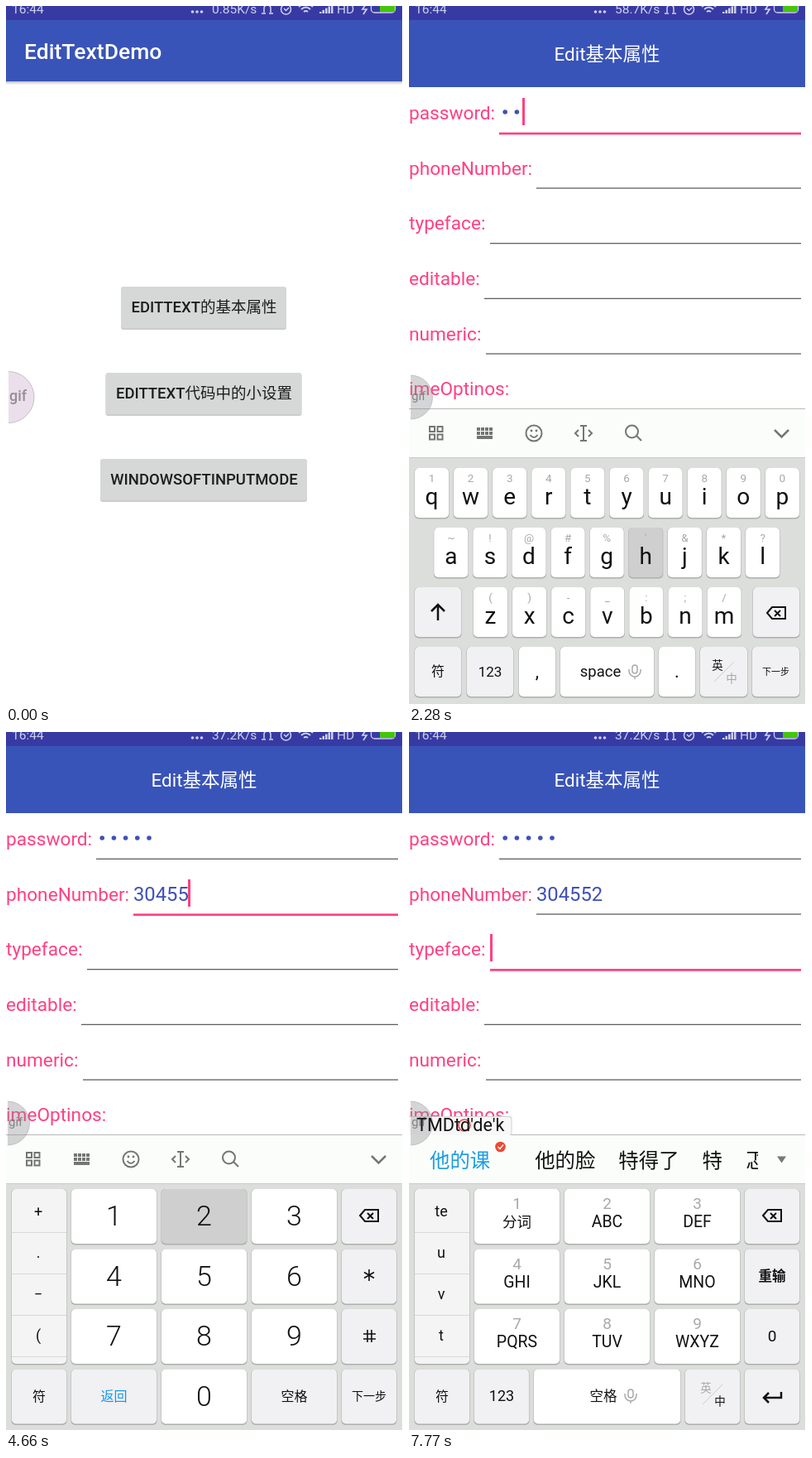
Animation of 480x843 px, one loop 8 s. Source, as an HTML page with a canvas:

```html
<!DOCTYPE html>
<html lang="zh-CN">
<head>
<meta charset="utf-8">
<title>EditTextDemo</title>
<style>
html, body { margin: 0; width: 100%; height: 100%; overflow: hidden; background: #fff; }
canvas { display: block; }
</style>
</head>
<body>
<canvas id="stage" width="480" height="843"></canvas>
<script>
const c = document.getElementById('stage').getContext('2d');
const LOOP = 8000, PINK = '#ff4081', BLUE = '#3f51b5', INK = '#111', GREY = '#a8a8a8';
const KEY = '#fff', SOFT = '#f1f0f2', DOWN = '#cfcfcf';
const FIELDS = ['password', 'phoneNumber', 'typeface', 'editable', 'numeric',
  'imeOptinos', 'digits', 'cursorVisible', 'textStyle', 'capitalize'];
const PHONE = '304552';
const BLINKS = [810, 1300, 3010, 3420, 5880, 6550, 7100, 7550];
const DOT_TIMES = [2150, 2255, 2360, 2465, 2570];
const DIGIT_TIMES = [4110, 4310, 4400, 4490, 4570, 5040];
const PRESSES = [
  [2150, 2255, 'g'], [2255, 2360, 'h'], [2360, 2465, 'j'], [2465, 2570, 'g'],
  [4490, 4660, '5'], [4660, 5040, '2'],
  [6035, 6110, 'TUV'], [6110, 6190, 'MNO'], [6550, 6643, 'DEF'], [7550, 7660, 'JKL']
];
// [start, composed text, candidates, side column]
const INPUTS = [
  [5880, '', null, '，,。,？,！'],
  [6035, '', '他,天,图,to,听,特,台,同', 'u,v,t,8'],
  [6190, '', '投,同,TM,to,UN,透,痛,他', 'u,v,t,8'],
  [6550, 'TMD', '同的,头的,特,同,TM,痛,图', 'u,v,t,8'],
  [6737, "TMDt'd", '他的,特点,天大,特地,特,同', 'te,u,v,t'],
  [7100, "TMDtd'd", '他的,特点,特得,天地,特,同', 'te,u,v,t'],
  [7300, "TMDtd'de", '特得,他的,天地的,特,同,图', 'te,u,v,t'],
  [7660, "TMDtd'de'k", '他的课,他的脸,特得了,特,忑', 'te,u,v,t']
];
let now = 0;

const passed = times => times.filter(t => t <= now).length;
const pressed = name => PRESSES.some(([a, b, k]) => k === name && now >= a && now < b);
const currentInput = () => INPUTS.filter(step => step[0] <= now).pop();

function box(x, y, w, h, fill) {
  c.fillStyle = fill;
  c.fillRect(x, y, w, h);
}
function round(x, y, w, h, r, fill) {
  c.beginPath();
  c.roundRect(x, y, w, h, r);
  c.fillStyle = fill;
  c.fill();
}
function disc(x, y, r, fill) {
  c.beginPath();
  c.arc(x, y, r, 0, 7);
  c.fillStyle = fill;
  c.fill();
}
function line(path, color, width = 2) {
  c.strokeStyle = color;
  c.lineWidth = width;
  c.stroke(new Path2D(path));
}
function font(size, weight = 400) {
  c.font = `${weight} ${size}px Roboto, "Noto Sans CJK SC", "Noto Sans CJK", sans-serif`;
}
function text(s, x, y, size, color = INK, align = 'center', weight = 400) {
  font(size, weight);
  c.textAlign = align;
  c.fillStyle = color;
  c.fillText(s, x, y);
  return c.measureText(s).width;
}

function bars(height) {
  box(0, 0, 480, 17, '#383aa4');
  box(0, 17, 480, height - 17, '#3954b8');
}
function homePage() {
  box(0, 0, 480, 843, '#fff');
  for (let i = 0; i < 4; i++) box(0, 91 + i, 480, 1, `rgba(0,0,0,${0.22 - i * 0.06})`);
  bars(91);
  text('EditTextDemo', 22, 64, 26.5, '#fff', 'left', 500);
  const buttons = [['EDITTEXT的基本属性', 200], ['EDITTEXT代码中的小设置', 237], ['WINDOWSOFTINPUTMODE', 250]];
  buttons.forEach(([name, w], i) => {
    const y = 339 + i * 104;
    round(239 - w / 2, y + 1, w, 51, 3, 'rgba(0,0,0,.2)');
    round(239 - w / 2, y, w, 50, 3, i === 0 && now >= 90 ? '#c9c9c9' : '#d6d7d7');
    text(name, 239.5, y + 31, 18.5, '#1d1d1d', 'center', 500);
  });
}
function formPage() {
  box(0, 0, 480, 843, '#fff');
  bars(98);
  text('Edit基本属性', 239.5, 66, 22.5, '#fff');
  const focus = passed([3470, 5233]), dots = passed(DOT_TIMES);
  const phone = PHONE.slice(0, passed(DIGIT_TIMES));
  FIELDS.forEach((name, i) => {
    const dy = i * 66.67, y = 152.7 + dy;
    const x = Math.round(text(name + ':', 0, 137 + dy, 22.67, PINK, 'left') + 5.1);
    let caret = x;
    if (i === 0) {
      for (let d = 0; d < dots; d++) disc(x + 7.2 + d * 14.2, 128, 2.8, BLUE);
      caret += dots * 14.1;
    }
    if (i === 1) caret += text(phone, x, 204, 23.8, BLUE, 'left');
    if (i === focus) {
      box(x, y, 474 - x, 2.7, PINK);
      if (passed(BLINKS) % 2 === 0) box(Math.floor(caret), Math.round(111 + dy), 3, 33, PINK);
    } else box(x, y, 474 - x, 1.3, '#606060');
  });
}

function statusBar() {
  const ink = '#cfd0ea';
  text('16:44', 7, 9, 15.5, ink, 'left');
  [225.5, 231, 236.5].forEach(x => disc(x, 7, 1.8, ink));
  const speed = now < 190 ? '0.85K/s' : now < 4310 ? '58.7K/s' : '37.2K/s';
  text(speed, 249, 9, 15.5, ink, 'left');
  line('M312 8V3Q312-1 316-1Q320-1 320 3V8M309 9H314M318 9H323', ink, 1.5);
  line('M344.5 4A6 6 0 1 1 332.500 4A6 6 0 1 1 344.500 4M336 3L338.500 5.500L342 2', ink, 1.5);
  line('M354 1Q362.500-6 371 1M357 4Q362.500-1 368 4M360 7Q362.500 5 365 7', ink, 2);
  for (let i = 0; i < 5; i++) box(379 + i * 3.5, 7 - i * 2.2, 2.5, 2 + i * 2.2, ink);
  text('HD', 400, 9, 15.5, ink, 'left');
  line('M435-2L431 4H436L432 10', ink, 1.7);
  c.beginPath();
  c.roundRect(441.5, -5, 29, 13, 4);
  c.strokeStyle = ink;
  c.lineWidth = 1.3;
  c.stroke();
  box(452, 0, 18, 7, '#43c60c');
}
function bubble() {
  const big = now < 90, r = big ? 31 : 26.5, left = big ? 3 : 2;
  c.save();
  c.beginPath();
  c.rect(left, 430, 60, 90);
  c.clip();
  disc(left, 472.5, r, big ? '#ecdfec' : 'rgba(140,140,145,.36)');
  c.strokeStyle = big ? '#c6bfc6' : 'rgba(140,140,140,.4)';
  c.lineWidth = 1;
  c.stroke();
  text('gif', left + 1, big ? 477 : 476, big ? 18 : 15, big ? '#949094' : 'rgba(100,100,100,.7)', 'left', big ? 500 : 400);
  c.restore();
}

function key(x, y, w, h, name, size, fill = KEY, color = INK, weight = 400) {
  round(x - 0.5, y, w + 1, h + 1.5, 5, '#aeb0ae');
  round(x, y, w, h, 5, pressed(name) ? DOWN : fill);
  if (size) text(name, x + w / 2, y + h / 2 + size * 0.33, size, color, 'center', weight);
}
function erase(x, y) {
  line(`M${x - 11} ${y}L${x - 5} ${y - 7}H${x + 11}V${y + 7}H${x - 5}ZM${x - 2} ${y - 3}L${x + 5} ${y + 4}M${x + 5} ${y - 3}L${x - 2} ${y + 4}`, INK);
}
function mic(x, y) {
  line(`M${x - 3} ${y - 4}a3 3 0 0 1 6 0v4a3 3 0 0 1-6 0zM${x - 7} ${y - 2}v2a7 7 0 0 0 14 0v-2M${x} ${y + 7}v3`, '#aaa', 1.5);
}
function language(x, y, chinese) {
  line(`M${x - 12} ${y + 12}L${x + 12} ${y - 12}`, '#ccc', 1);
  text('英', x - 8, y - 3, 13.5, chinese ? GREY : INK, 'center', chinese ? 400 : 500);
  text('中', x + 9, y + 13, 13.5, chinese ? INK : GREY, 'center', chinese ? 500 : 400);
}
function toolbar() {
  const ink = '#747674';
  for (const x of [25, 34.5]) for (const y of [508, 517.5]) line(`M${x} ${y}h6v6h-6z`, ink);
  for (let i = 0; i < 8; i++) box(82 + i % 4 * 5, 509 + (i >> 2) * 5, 4, 4, ink);
  box(82, 519, 19, 4, ink);
  line('M160.500 516a9.500 9.500 0 1 1-19 0a9.500 9.500 0 1 1 19 0M146.500 518q4.500 6 9 0', ink);
  disc(148, 513, 1.4, ink);
  disc(154, 513, 1.4, ink);
  line('M207 507h8M211 507v18M207 525h8M205 512l-4 4l4 4M217 512l4 4l-4 4', ink);
  line('M277 514a7.500 7.500 0 1 1-15 0a7.500 7.500 0 1 1 15 0M275 519l6 6', ink);
  line('M442 512l8.500 8.500l8.500-8.500', ink, 2.5);
}
function candidates(list, badge) {
  c.save();
  c.beginPath();
  c.rect(0, 487, 422, 58);
  c.clip();
  let x = 25;
  list.split(',').forEach((word, i) => {
    x += text(word, x, 526, 24.4, i ? INK : '#1b9ce4', 'left') + (i ? 28 : badge ? 54 : 36);
  });
  c.restore();
  if (badge) {
    disc(110.5, 501, 6.3, '#ea4b35');
    line('M107.500 501l2.500 2.500l4-5', '#fff', 1.3);
  }
  c.fillStyle = '#777';
  c.fill(new Path2D('M445 512.500h11l-5.500 8z'));
}

function letterKeys() {
  const rows = [
    ['qwertyuiop', '1234567890', 7, 558], ['asdfghjkl', "~!@#%'&*?", 30.3, 630], ['zxcvbnm', '()-_:;/', 78, 702]
  ];
  for (const [letters, hints, left, y] of rows) {
    [...letters].forEach((letter, i) => {
      const x = left + i * 47.1;
      key(x, y, 41, 60, letter, 0);
      text(hints[i], x + 20.5, y + 17, 13.5, GREY);
      text(letter, x + 20.5, y + 44, 28);
    });
  }
  key(7, 702, 56, 60, '', 0, SOFT);
  line('M35 742V723M27 731L35 723L43 731', INK, 2.5);
  key(416, 702, 56, 60, '', 0, SOFT);
  erase(444, 733);
  key(7, 774, 56, 60, '符', 16, SOFT);
  key(70, 774, 56, 60, '123', 17, SOFT);
  key(133, 774, 44, 60, ',', 22);
  key(183, 774, 113, 60, '', 0);
  text('space', 231.5, 810, 18.5);
  mic(273, 803);
  key(302, 774, 44, 60, '.', 22);
  key(352, 774, 57, 60, '', 0, SOFT);
  language(381, 804, false);
  key(415, 774, 57, 60, '下一步', 11, SOFT);
}
function padFrame(side, right) {
  key(7, 552, 66, 211, '', 0, '#f5f4f5');
  side.split(',').forEach((s, i) => {
    text(s, 39, 585 + i * 50, 18);
    box(7, 604 + i * 50, 66, 1, '#d8d8d8');
  });
  key(406, 552, 66, 66, '', 0, SOFT);
  erase(439, 584);
  right.forEach(([s, size, weight], i) => key(406, 624.5 + i * 72.5, 66, 66, s, size, SOFT, INK, weight));
  key(7, 769.5, 66, 66, '符', 16, SOFT);
}
function padKeys(draw) {
  for (let i = 0; i < 9; i++) draw(79 + i % 3 * 109, 552 + Math.floor(i / 3) * 72.5, i);
}
function numberKeys() {
  padFrame('+,.,−,(', [['', 0], ['', 0]]);
  line('M439 649v14M433 652.500l12 7M445 652.500l-12 7', INK, 1.6);
  line('M437 722v15M442 722v15M432 727h15M432 733h15', INK, 1.6);
  const digit = (x, y, n) => key(x, y, 103, 66, String(n), 34, KEY, INK, 300);
  padKeys((x, y, i) => digit(x, y, i + 1));
  digit(188, 769.5, 0);
  key(79, 769.5, 103, 66, '返回', 16, SOFT, '#1296ee');
  key(297, 769.5, 103, 66, '空格', 16, SOFT, INK, 500);
  key(406, 769.5, 66, 66, '下一步', 14, SOFT);
}
function phraseKeys(side) {
  padFrame(side, [['重输', 16.5, 700], ['0', 19, 400]]);
  const names = '分词,ABC,DEF,GHI,JKL,MNO,PQRS,TUV,WXYZ'.split(',');
  padKeys((x, y, i) => {
    key(x, y, 103, 66, names[i], 0);
    text(i + 1, x + 51.5, y + 24, 19, GREY);
    text(names[i], x + 51.5, y + 46, i ? 19.5 : 17.5);
  });
  key(79, 769.5, 66, 66, '123', 18, SOFT);
  key(151, 769.5, 177, 66, '', 0);
  text('空格', 235, 808, 16.5, INK, 'center', 500);
  mic(268, 801);
  key(334, 769.5, 66, 66, '', 0, SOFT);
  language(367, 800, true);
  key(406, 769.5, 66, 66, '', 0, SOFT);
  line('M450 797v7H429M435 798l-6 6l6 6', INK, 2.5);
}
function composingBox(word) {
  font(21.6);
  const w = c.measureText(word).width + 18;
  round(-4, 464, w + 4, 23, 3, '#d2d2d2');
  round(-4, 465, w + 3, 22, 3, '#f8f7f8');
  if (now >= 7660) {
    c.beginPath();
    c.arc(67, 475, 7, 0, 7);
    c.strokeStyle = '#ea4b45';
    c.lineWidth = 1.6;
    c.stroke();
  }
}
function keyboard(input) {
  if (now < 1940) return;
  c.save();
  if (now < 2045) c.translate(0, 180);
  box(0, 486, 480, 357, '#b7bab7');
  box(0, 487, 480, 58, '#fafdfa');
  box(0, 545, 480, 298, '#dcdedc');
  box(0, 545, 480, 1, '#c9cbc9');
  if (input && input[2]) candidates(input[2], now >= 7660);
  else toolbar();
  if (input) phraseKeys(input[3]);
  else if (now >= 4040) numberKeys();
  else letterKeys();
  c.restore();
}

function slideProgress() {
  const tick = [0, 90, 190, 290, 380, 480, 580].filter(t => t <= now).pop();
  const u = Math.max(0, (tick - 153.5) / 426.5);
  return u * u * (3 - 2 * u);
}
function draw() {
  now = performance.now() % LOOP;
  const p = slideProgress();
  if (p < 1) {
    c.save();
    c.translate(Math.round(-105 * p), 0);
    homePage();
    c.restore();
    box(0, 0, 480, 843, `rgba(0,0,0,${0.35 * p})`);
  }
  if (p > 0) {
    c.save();
    c.translate(Math.round(480 * (1 - p)), 0);
    formPage();
    c.restore();
  }
  statusBar();
  const input = currentInput(), word = input && input[1];
  keyboard(input);
  if (word) composingBox(word);
  bubble();
  if (word) text(word, 9, 482, 21.6, INK, 'left');
  box(479, 0, 1, 843, '#fff');
  requestAnimationFrame(draw);
}
draw();
</script>
</body>
</html>
```
